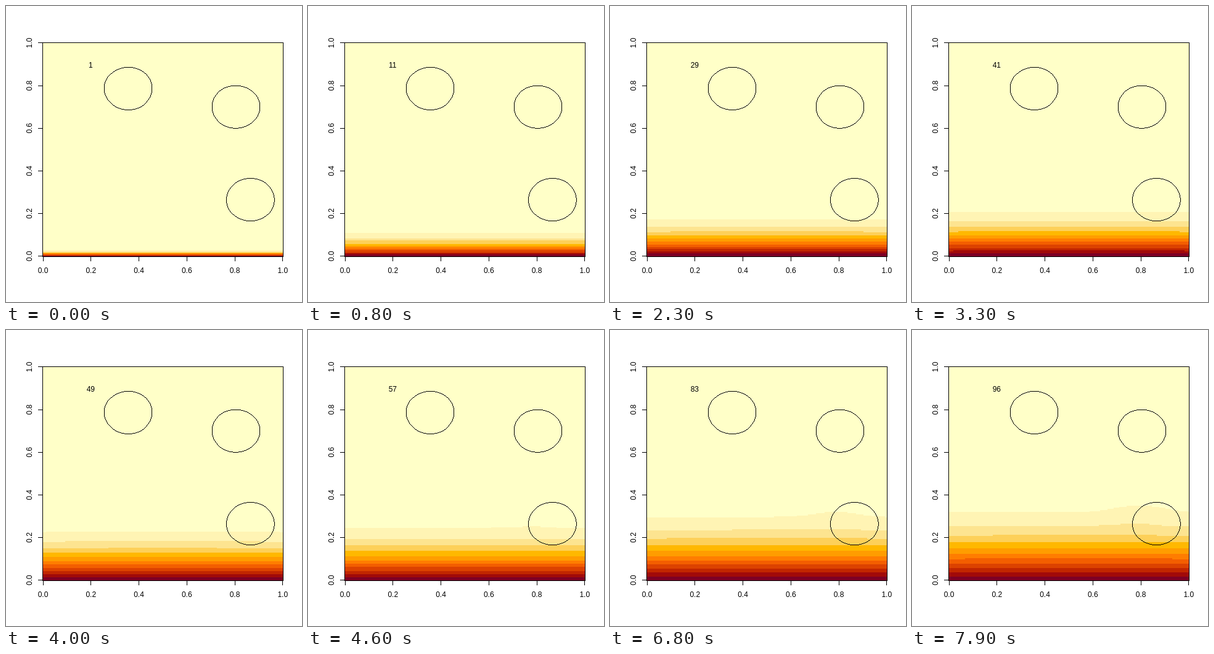
An HTML page with a canvas for the animation above (8 s loop, 480 by 480 pixels).

```html
<!DOCTYPE html>
<html lang="en">
<head>
<meta charset="utf-8">
<title>Heat diffusion</title>
<style>
html, body { margin: 0; width: 100%; height: 100%; overflow: hidden; background: #fff; }
canvas { display: block; width: 480px; height: 480px; }
</style>
</head>
<body>
<canvas id="stage" width="480" height="480"></canvas>
<script>
const ctx = document.getElementById('stage').getContext('2d');
const LOOP = 8000, STEP = 100, CELLS = 200;
const LEFT = 59.04, WIDTH = 390.72, BOTTOM = 406.56, HEIGHT = 347.52;
const CW = WIDTH / CELLS, CH = HEIGHT / CELLS;
const px = v => LEFT + CW / 2 + v * (WIDTH - CW);
const py = v => BOTTOM - CH / 2 - v * (HEIGHT - CH);
const discs = [[0.355, 0.786], [0.805, 0.7], [0.865, 0.265]];

// Inverse erfc of k/12, k = 1..11
const LEVELS = [1.2245, 0.9779, 0.8134, 0.6841, 0.5743, 0.4769, 0.3879, 0.3046, 0.2253, 0.1488, 0.0739];

// Polar LUV to sRGB
function hcl(h, c, l) {
  const a = h * Math.PI / 180;
  const Y = l > 8 ? ((l + 16) / 116) ** 3 : l / 903.3;
  const u = c * Math.cos(a) / (13 * l) + 0.1978398;
  const v = c * Math.sin(a) / (13 * l) + 0.4683363;
  const X = 9 * Y * u / (4 * v), Z = -X / 3 - 5 * Y + 3 * Y / v;
  const gamma = s => s > 0.00304 ? 1.055 * s ** (1 / 2.4) - 0.055 : 12.92 * s;
  const rgb = [
    3.240479 * X - 1.53715 * Y - 0.498535 * Z,
    -0.969256 * X + 1.875992 * Y + 0.041556 * Z,
    0.055648 * X - 0.204043 * Y + 1.057311 * Z
  ].map(s => Math.round(255 * Math.min(1, Math.max(0, gamma(s)))));
  return `rgb(${rgb})`;
}

// Yellow to dark red, chroma peaking in the middle
const palette = Array.from({ length: 12 }, (_, n) => {
  const i = n / 11, j = 1 / (1 + 105 / 140);
  const c = i <= j ? 40 + 140 * (i / j) ** 1.6 : 180 - 105 * ((i - j) / (1 - j)) ** 1.6;
  return hcl(85 - 80 * i, c, 99 - 74 * i ** 1.3);
});

// Height of an isotherm above the hot edge, lifted by the lower disc
function isotherm(h, x, spread) {
  const wall = Math.min(x - LEFT, LEFT + WIDTH - x);
  const d = x - 368;
  const sigma = d < 0 ? 38 : Math.max(15, (h - 59) * 0.8);
  const lift = 0.045 * Math.max(0, h - 70) ** 1.5;
  return h * (1 - 0.005 * Math.exp(-wall / spread)) + lift * Math.exp(-d * d / (2 * sigma * sigma));
}

function drawHeat(n) {
  const spread = 9.192 * Math.sqrt(n - 0.3);
  ctx.fillStyle = palette[0];
  ctx.fillRect(59, 59, 391, 348);
  LEVELS.forEach((level, k) => {
    ctx.fillStyle = palette[k + 1];
    for (let i = 0; i < CELLS; i++) {
      const x0 = Math.round(LEFT + i * CW), x1 = Math.round(LEFT + (i + 1) * CW);
      const rows = Math.floor(isotherm(level * spread, LEFT + (i + 0.5) * CW, spread) / CH) + 1;
      const top = Math.round(BOTTOM - rows * CH);
      ctx.fillRect(x0, top, x1 - x0, 407 - top);
    }
  });
}

// One-pixel ellipse outline without smoothing
function drawRing(cx, cy) {
  const a = 0.1 * (WIDTH - CW), b = 0.1 * (HEIGHT - CH), r = Math.hypot(a, b);
  const dot = (x, y) => ctx.fillRect(Math.floor(x), Math.floor(y), 1, 1);
  for (let x = Math.ceil(-a * a / r); x <= a * a / r; x++) {
    const y = b * Math.sqrt(1 - x * x / (a * a));
    dot(cx + x, cy + y);
    dot(cx + x, cy - y);
  }
  for (let y = Math.ceil(-b * b / r); y <= b * b / r; y++) {
    const x = a * Math.sqrt(1 - y * y / (b * b));
    dot(cx + x, cy + y);
    dot(cx - x, cy + y);
  }
}

function drawAxes() {
  ctx.strokeStyle = '#000';
  ctx.lineWidth = 1;
  ctx.strokeRect(59.5, 59.5, 390, 347);
  for (let i = 0; i <= 5; i++) {
    const v = i / 5, label = v.toFixed(1);
    const x = Math.floor(px(v)), y = Math.floor(py(v) + 1e-6);
    ctx.fillRect(x, 406, 1, 8);
    ctx.fillRect(52, y, 8, 1);
    ctx.fillText(label, px(v), 433);
    ctx.save();
    ctx.translate(42, py(v));
    ctx.rotate(-Math.PI / 2);
    ctx.fillText(label, 0, 0);
    ctx.restore();
  }
}

function draw(time) {
  const n = Math.ceil(1 + Math.floor((time % LOOP) / STEP) * 6 / 5);
  ctx.fillStyle = '#fff';
  ctx.fillRect(0, 0, 480, 480);
  drawHeat(n);
  ctx.fillStyle = '#000';
  ctx.font = '12px "Liberation Sans", Arial, sans-serif';
  ctx.textAlign = 'center';
  drawAxes();
  discs.forEach(([x, y]) => drawRing(px(x), py(y)));
  ctx.fillText(n, 137.3, 100);
}

let start;
function tick(now) {
  if (start === undefined) start = now;
  draw(now - start);
  requestAnimationFrame(tick);
}
draw(0);
requestAnimationFrame(tick);
</script>
</body>
</html>
```
